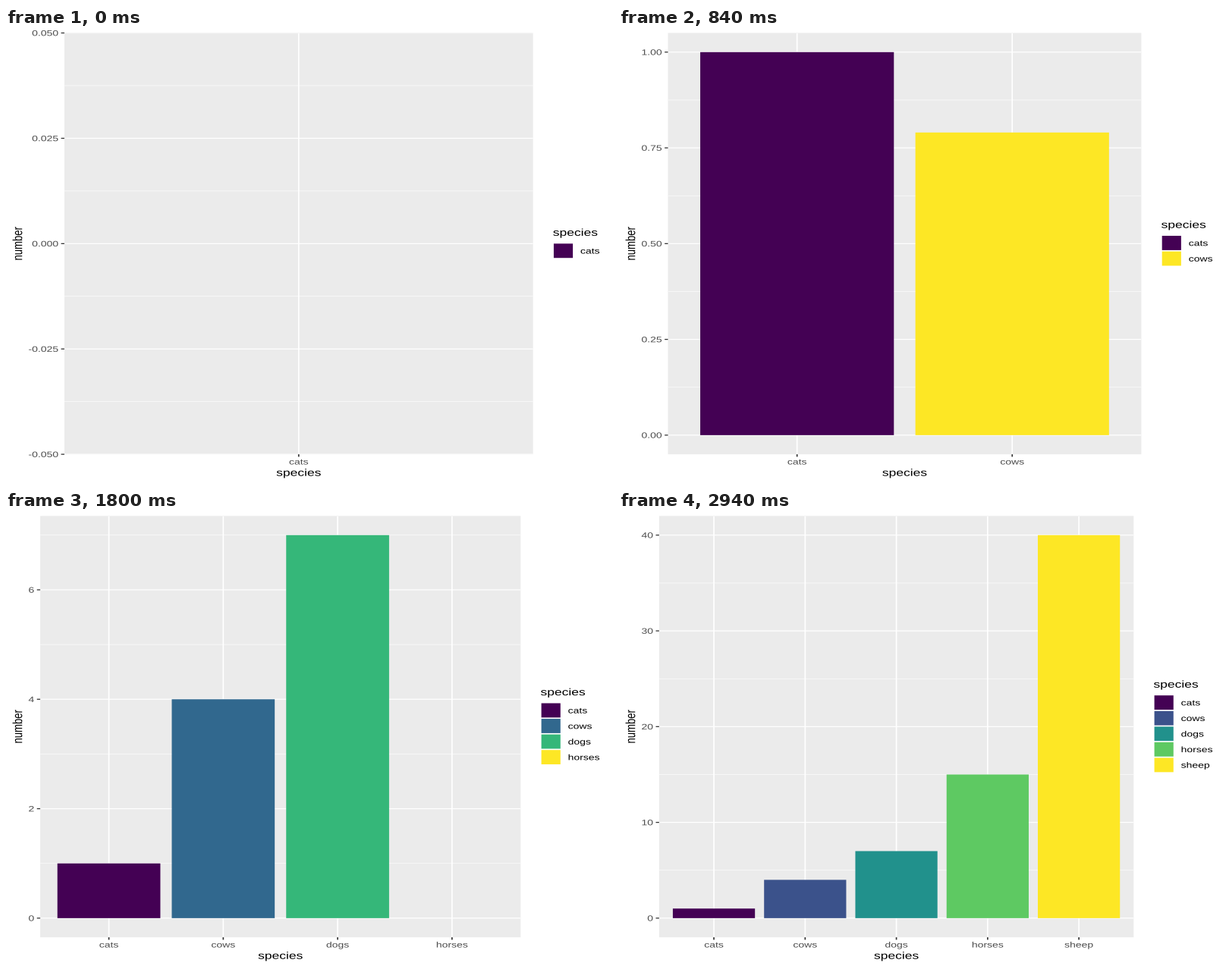
These frames come from a looping animation (800 px wide and 600 px high, 3000 ms). A matplotlib script:

```python
import math

import matplotlib
import matplotlib.pyplot as plt
import numpy as np
from matplotlib.animation import FuncAnimation
from matplotlib.patches import PathPatch, Rectangle
from matplotlib.textpath import TextPath
from matplotlib.transforms import Affine2D

# Square stage of 504 pt, shown on an 800 x 600 canvas.
SIDE = 504
HALF = 5.5
BASE, SMALL = 11, 8.8
LINE_H, ASCENT = 0.94, 0.716
TICK, KEY = 2.75, 17.28
MAJOR, MINOR = 1.07, 0.53
FONT = {"family": "Liberation Sans"}

SPECIES = ["cats", "cows", "dogs", "horses", "sheep"]
TOTALS = [1, 4, 7, 15, 40]
STEPS = 10
NICE = [1, 5, 2, 2.5, 4, 3]

fig = plt.figure(figsize=(8, 6), dpi=100, facecolor="white")
ax = fig.add_axes([0, 0, 1, 1])


def text_width(s, size):
    """Advance width, measured with a trailing bar."""
    def right(t):
        return TextPath((0, 0), t, size=size, prop=FONT).get_extents().x1
    return right(s + "|") - right("|")


def text(x, y, s, size, color="black", align=0.0, angle=0):
    path = TextPath((0, 0), s, size=size, prop=FONT)
    move = (Affine2D().translate(-align * text_width(s, size), 0)
            .rotate_deg(angle).translate(x, y))
    ax.add_artist(PathPatch(path, fc=color, lw=0, transform=move + ax.transData))


def rect(x0, y0, x1, y1, color, clip=None):
    box = Rectangle((x0, y0), x1 - x0, y1 - y0, fc=color, lw=0, snap=False)
    ax.add_artist(box)
    if clip is not None:
        box.set_clip_path(clip)
    return box


def hline(x0, x1, y, weight, color, clip=None):
    rect(x0, y - weight / 2, x1, y + weight / 2, color, clip)


def vline(x, y0, y1, weight, color, clip=None):
    rect(x - weight / 2, y0, x + weight / 2, y1, color, clip)


def tick_values(lo, hi, goal=5):
    """Best evenly spaced ticks by simplicity, coverage and density."""
    span = hi - lo
    power = math.floor(math.log10(span))
    best, pick = -math.inf, None
    for rank, q in enumerate(NICE):
        for z in (power - 1, power):
            step = q * 10.0 ** z
            for k in range(2, 13):
                first = math.floor(hi / step) - (k - 1)
                for start in range(first, math.ceil(lo / step) + 1):
                    a, b = start * step, (start + k - 1) * step
                    simple = -rank / (len(NICE) - 1) + (a <= 0 <= b)
                    cover = 1 - 0.5 * ((hi - b) ** 2 + (lo - a) ** 2) / (0.1 * span) ** 2
                    ratio = ((k - 1) / (b - a)) * (max(b, hi) - min(a, lo)) / (goal - 1)
                    dense = 2 - max(ratio, 1 / ratio)
                    score = 0.25 * simple + 0.2 * cover + 0.5 * dense
                    if score > best + 1e-9:
                        best, pick = score, (start, k, step)
    start, k, step = pick
    eps = span * 1e-6

    def inside(values):
        return [round(v, 10) + 0.0 for v in values if lo - eps <= v <= hi + eps]

    majors = inside((start + i) * step for i in range(k))
    minors = inside((start + i - 0.5) * step for i in range(k + 1))
    return majors, minors


def tick_labels(values):
    digits = 0
    while any(abs(round(v, digits) - v) > 1e-8 for v in values):
        digits += 1
    return [f"{v:.{digits}f}" for v in values]


def draw_legend(names, colors, left, middle):
    height = LINE_H * BASE + HALF + KEY * len(names)
    top = middle + height / 2
    text(left, top - ASCENT * BASE, "species", BASE)
    top -= LINE_H * BASE + HALF
    inset = 0.71
    for name, color in zip(names, colors):
        rect(left + inset, top - KEY + inset, left + KEY - inset, top - inset, color)
        text(left + KEY + HALF, top - KEY / 2 - ASCENT * SMALL / 2, name, SMALL)
        top -= KEY


def draw(frame):
    ax.clear()
    ax.set(xlim=(0, SIDE), ylim=(0, SIDE))
    ax.axis("off")

    current, phase = divmod(frame, STEPS)
    n = current + 1
    names = SPECIES[:n]
    heights = TOTALS[:current] + [TOTALS[current] * (phase / (STEPS - 1)) ** 2]
    colors = matplotlib.colormaps["viridis"](np.linspace(0, 1, n))

    peak = max(heights)
    lo, hi = (-0.05 * peak, 1.05 * peak) if peak else (-0.05, 0.05)
    majors, minors = tick_values(lo, hi)
    labels = tick_labels(majors)

    # Layout: legend and labels decide the panel's size
    label_w = max(text_width(s, SMALL) for s in labels)
    legend_w = max([text_width("species", BASE)]
                   + [KEY + HALF + text_width(s, SMALL) for s in names])
    legend_x = SIDE - 2 * HALF - legend_w
    gap = TICK + 2.2
    left = HALF + LINE_H * BASE + 2.75 + label_w + gap
    right = legend_x - 3 * HALF
    bottom = HALF + LINE_H * BASE + 2.75 + LINE_H * SMALL + gap
    top = SIDE - HALF
    mid_x, mid_y = (left + right) / 2, (bottom + top) / 2

    def px(v):
        return left + (v - 0.4) / (n + 0.2) * (right - left)

    def py(v):
        return bottom + (v - lo) / (hi - lo) * (top - bottom)

    panel = rect(left, bottom, right, top, "#EBEBEB")
    for v in minors:
        hline(left, right, py(v), MINOR, "white", panel)
    for v in majors:
        hline(left, right, py(v), MAJOR, "white", panel)
    for i in range(1, n + 1):
        vline(px(i), bottom, top, MAJOR, "white", panel)

    for i, (h, color) in enumerate(zip(heights, colors), 1):
        if h:
            rect(px(i - 0.45), py(0), px(i + 0.45), py(h), color)

    for v, label in zip(majors, labels):
        hline(left - TICK, left, py(v), MAJOR, "#333333")
        text(left - gap, py(v) - ASCENT * SMALL / 2, label, SMALL, "#4D4D4D", 1)
    for i, name in enumerate(names, 1):
        vline(px(i), bottom - TICK, bottom, MAJOR, "#333333")
        text(px(i), bottom - gap - ASCENT * SMALL, name, SMALL, "#4D4D4D", 0.5)

    text(mid_x, HALF + 0.212 * BASE, "species", BASE, align=0.5)
    text(HALF + ASCENT * BASE, mid_y, "number", BASE, align=0.5, angle=90)
    draw_legend(names, colors, legend_x, mid_y)
    return []


anim = FuncAnimation(fig, draw, frames=STEPS * len(SPECIES), interval=60,
                     repeat=True, repeat_delay=0, blit=False)
plt.show()
```
